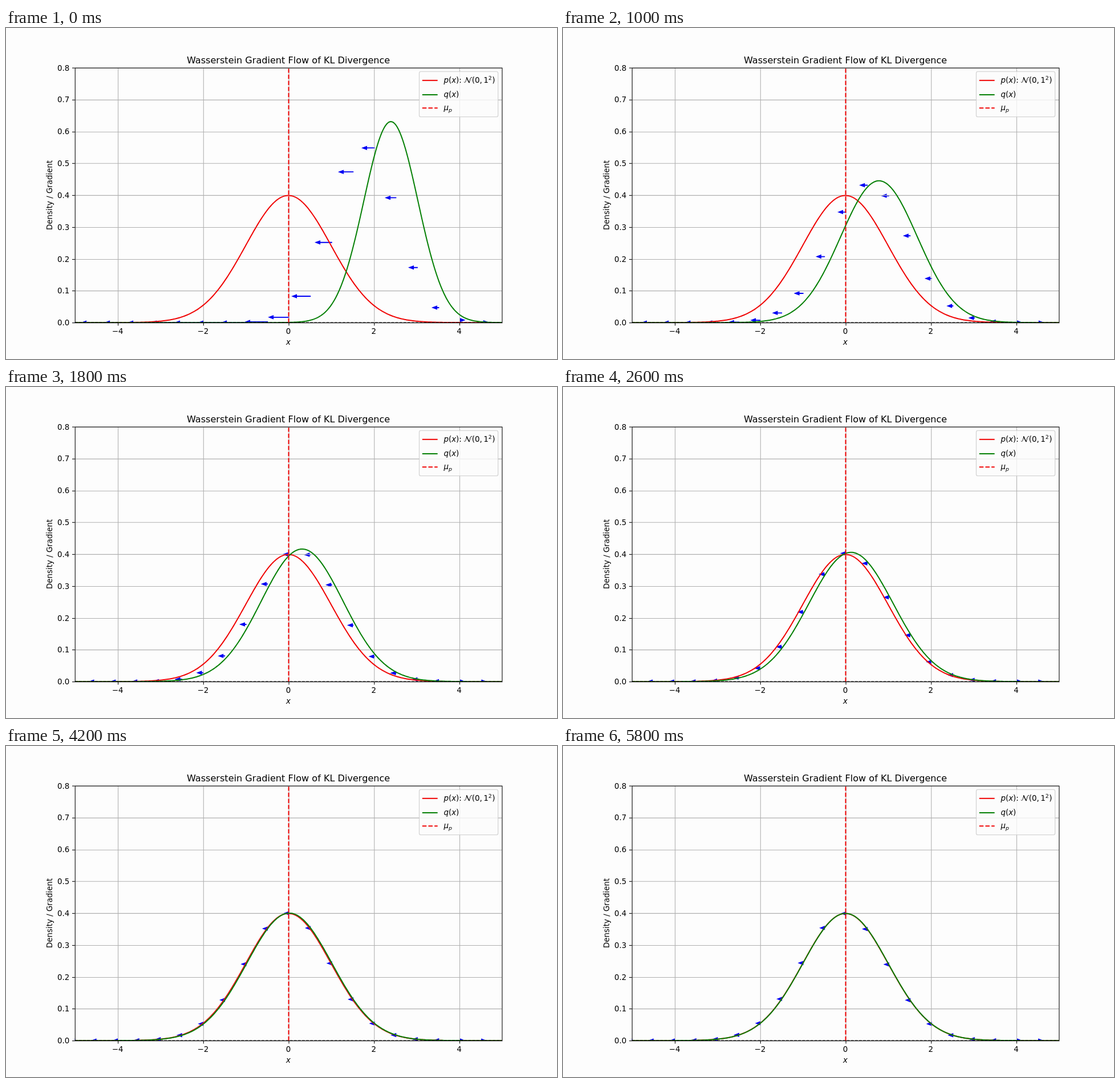
An HTML page with a canvas that plays this animation: 966x580 px, repeating every 6 s.

```html
<!DOCTYPE html>
<html lang="en">
<head>
<meta charset="utf-8">
<title>Gradient flow</title>
<style>
  html, body { margin: 0; width: 100%; height: 100%; overflow: hidden; background: #fdfdfd; }
  canvas { display: block; }
</style>
</head>
<body>
<canvas id="plot" width="966" height="580"></canvas>
<script>
const ctx = document.getElementById('plot').getContext('2d');

// Layout lives on a 1000 x 600 figure, scaled to the stage.
const W = 1000, H = 600;
const LEFT = 125, RIGHT = 900, TOP = 72, BOTTOM = 534;
const PT = 100 / 72;
const STEP = 200, STEPS = 30, DECAY = 0.8;
const SAMPLES = 400, ARROW_EVERY = 20;
const RED = '#f00505', GREEN = '#068006', BLUE = '#0000f4', BG = '#fdfdfd';
const FONT = '"DejaVu Sans", Verdana, sans-serif';

const px = x => LEFT + (x + 5) * (RIGHT - LEFT) / 10;
const py = y => BOTTOM - y * (BOTTOM - TOP) / 0.8;
const snap = v => Math.round(v) + 0.5;
const sample = i => -5 + 10 * i / (SAMPLES - 1);

const density = (x, m, v) => Math.exp(-((x - m) ** 2) / (2 * v)) / Math.sqrt(2 * Math.PI * v);

// Mean and variance relax towards those of the standard normal.
function state(k) {
  const c = DECAY ** k;
  return { m: 2.4 * c, v: 1 - 0.6 * c };
}

function line(points, color, width, dash = []) {
  ctx.beginPath();
  points.forEach(([x, y]) => ctx.lineTo(x, y));
  ctx.strokeStyle = color;
  ctx.lineWidth = width;
  ctx.setLineDash(dash);
  ctx.stroke();
  ctx.setLineDash([]);
}

const dashes = width => [3.7 * width, 1.6 * width];

function curve(m, v, color) {
  const points = [];
  for (let i = 0; i < SAMPLES; i++) {
    const x = sample(i);
    points.push([px(x), py(density(x, m, v))]);
  }
  ctx.lineJoin = 'round';
  line(points, color, 1.5 * PT);
}

function text(str, x, y, { size = 10, align = 'left', style = 'normal' } = {}) {
  ctx.font = `${style} ${size * PT}px ${FONT}`;
  ctx.textAlign = align;
  ctx.fillStyle = '#000';
  ctx.fillText(str, x, y);
  return x + ctx.measureText(str).width;
}

const italic = { style: 'italic' };

function arrow(x, y, dx) {
  const neck = px(x + dx), tip = px(x + dx + Math.sign(dx) * 0.1);
  const tail = px(x), mid = py(y);
  const shaft = mid - py(y + 0.0005), head = mid - py(y + 0.005);
  ctx.beginPath();
  ctx.moveTo(tip, mid);
  ctx.lineTo(neck, mid - head);
  ctx.lineTo(neck, mid - shaft);
  ctx.lineTo(tail, mid - shaft);
  ctx.lineTo(tail, mid + shaft);
  ctx.lineTo(neck, mid + shaft);
  ctx.lineTo(neck, mid + head);
  ctx.closePath();
  ctx.lineJoin = 'miter';
  ctx.lineWidth = PT;
  ctx.fillStyle = ctx.strokeStyle = BLUE;
  ctx.fill();
  ctx.stroke();
}

function arrows({ m, v }) {
  for (let i = 0; i < SAMPLES; i += ARROW_EVERY) {
    const x = sample(i);
    arrow(x, density(x, m, v), 0.1 * ((x - m) / v - x));
  }
}

function grid() {
  for (let x = -4; x <= 4; x += 2) {
    const gx = snap(px(x));
    line([[gx, TOP], [gx, BOTTOM]], '#b0b0b0', 1.1);
  }
  for (let i = 0; i <= 8; i++) {
    const gy = snap(py(i / 10));
    line([[LEFT, gy], [RIGHT, gy]], '#b0b0b0', 1.1);
  }
}

function axes() {
  for (let x = -4; x <= 4; x += 2) {
    const tx = snap(px(x));
    line([[tx, BOTTOM], [tx, BOTTOM + 5.4]], '#000', 1.1);
    text(String(x).replace('-', '\u2212'), px(x), 554.7, { align: 'center' });
  }
  for (let i = 0; i <= 8; i++) {
    const y = py(i / 10), ty = snap(y);
    line([[LEFT, ty], [LEFT - 4.9, ty]], '#000', 1.1);
    text((i / 10).toFixed(1), 115.3, y + 5.2, { align: 'right' });
  }
  ctx.strokeStyle = '#000';
  ctx.lineWidth = 1.1;
  ctx.strokeRect(LEFT + 0.5, TOP + 0.5, RIGHT - LEFT, BOTTOM - TOP);

  text('Wasserstein Gradient Flow of KL Divergence', 512.5, 64, { size: 12, align: 'center' });
  text('x', 512.5, 574, { align: 'center', style: 'italic' });
  ctx.save();
  ctx.translate(84.2, 303);
  ctx.rotate(-Math.PI / 2);
  text('Density / Gradient', 0, 0, { align: 'center' });
  ctx.restore();
}

// Calligraphic capital N, drawn because fonts may lack it.
function scriptN(x, y) {
  ctx.save();
  ctx.translate(x, y);
  ctx.strokeStyle = '#000';
  ctx.lineCap = ctx.lineJoin = 'round';
  ctx.lineWidth = 1;
  ctx.beginPath();
  ctx.moveTo(0.3, -1.2);
  ctx.bezierCurveTo(2.2, 1.6, 3.8, -4, 4.8, -9.4);
  ctx.moveTo(9.4, -0.3);
  ctx.bezierCurveTo(10.8, -4, 11, -10.8, 14.4, -9.8);
  ctx.stroke();
  ctx.lineWidth = 1.5;
  ctx.beginPath();
  ctx.moveTo(4.8, -9.4);
  ctx.bezierCurveTo(6, -7, 7.6, -2.6, 9.2, -0.4);
  ctx.stroke();
  ctx.restore();
}

const LABEL_X = 794.4;

function fnOfX(name, y) {
  let x = text(name, LABEL_X, y, italic);
  x = text('(', x, y);
  x = text('x', x, y, italic);
  return text(')', x, y);
}

function legend() {
  ctx.beginPath();
  ctx.roundRect(750, 79, 143, 82, 2.8);
  ctx.globalAlpha = 0.8;
  ctx.fillStyle = BG;
  ctx.fill();
  ctx.strokeStyle = '#ccc';
  ctx.lineWidth = PT;
  ctx.stroke();
  ctx.globalAlpha = 1;

  const w = 1.5 * PT;
  const handle = (y, color, dash) => line([[755.5, y], [783.3, y]], color, w, dash);
  handle(95, RED);
  handle(121, GREEN);
  handle(145, RED, dashes(w));

  let x = text(': ', fnOfX('p', 99.3), 99.3);
  scriptN(x, 99.3);
  x = text('(0,', x + 14.2, 99.3);
  x = text('1', x + 2.6, 99.3);
  x = text('2', x, 94.2, { size: 7 });
  text(')', x + 0.4, 99.3);

  fnOfX('q', 125.6);

  x = text('\u03bc', LABEL_X, 149.3, italic);
  text('p', x, 151.6, { size: 7, style: 'italic' });
}

function draw(k) {
  const q = state(k), w = 1.5 * PT;
  ctx.setTransform(966 / W, 0, 0, 580 / H, 0, 0);
  ctx.fillStyle = BG;
  ctx.fillRect(0, 0, W, H);

  ctx.save();
  ctx.beginPath();
  ctx.rect(LEFT, TOP, RIGHT - LEFT, BOTTOM - TOP + 0.5);
  ctx.clip();
  arrows(state(k + 1));
  grid();
  curve(0, 1, RED);
  curve(q.m, q.v, GREEN);
  line([[LEFT, BOTTOM], [RIGHT, BOTTOM]], '#000', PT, dashes(PT));
  line([[513, BOTTOM], [513, TOP]], RED, w, dashes(w));
  ctx.restore();

  axes();
  legend();
}

const start = performance.now();
let shown = -1;
function tick() {
  const k = Math.floor((performance.now() - start) / STEP) % STEPS;
  if (k !== shown) draw(shown = k);
  requestAnimationFrame(tick);
}
tick();
</script>
</body>
</html>
```
